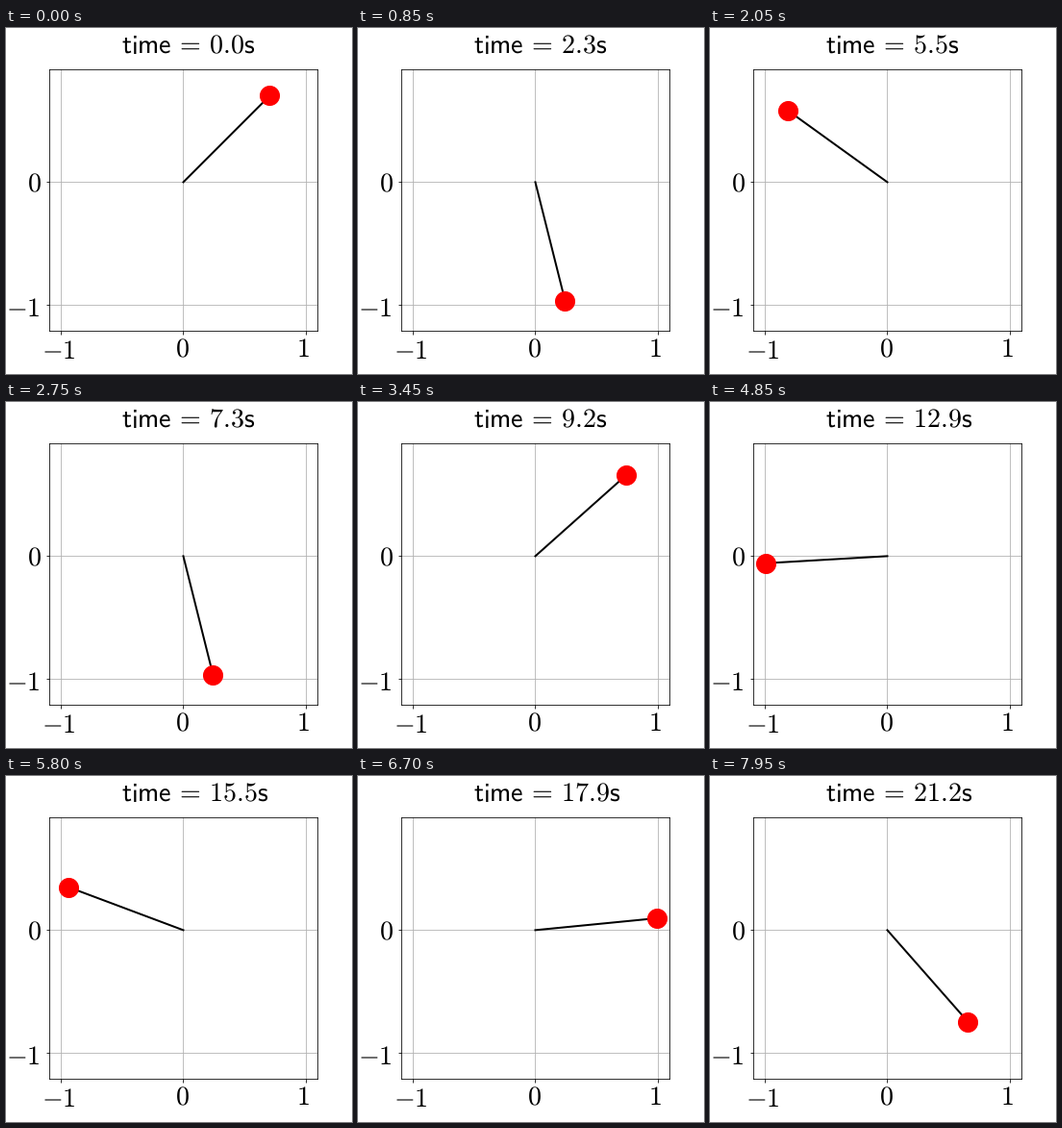
A matplotlib script that plays this animation: 360x360 px, repeating every 8000 ms.

```python
import numpy as np
import matplotlib.pyplot as plt
from matplotlib.animation import FuncAnimation

plt.rcParams["mathtext.fontset"] = "cm"
plt.rcParams["text.hinting"] = "none"

SIZE = 360
FRAMES = 160
DT = 2 / 15        # pendulum time per frame
SUBSTEPS = 20
LEFT, RIGHT, TOP, BOTTOM = 44.59, 324.39, 43, 315
FONT = 28


def slope(state):
    angle, speed = state
    return np.array([speed, -np.sin(angle)])


def swing():
    """Angles from the downward vertical, one per frame (RK4)."""
    state = np.array([0.75 * np.pi, 0.0])
    h = DT / SUBSTEPS
    angles = []
    for _ in range(FRAMES):
        angles.append(state[0])
        for _ in range(SUBSTEPS):
            k1 = slope(state)
            k2 = slope(state + h / 2 * k1)
            k3 = slope(state + h / 2 * k2)
            k4 = slope(state + h * k3)
            state = state + h / 6 * (k1 + 2 * k2 + 2 * k3 + k4)
    return np.array(angles)


def label(x, y, text):
    """Text with its left end and baseline at a pixel, y counted downwards."""
    return fig.text(x / SIZE, 1 - y / SIZE, text, fontsize=FONT,
                    ha="left", va="baseline")


def clock(t):
    return rf"$\mathsf{{time\hspace{{0.18}}=\hspace{{0.18}}{t:.1f}s}}$"


angles = swing()
xs, ys = np.sin(angles), -np.cos(angles)

fig = plt.figure(figsize=(5, 5), dpi=72, facecolor="white")
ax = fig.add_axes([LEFT / SIZE, 1 - BOTTOM / SIZE,
                   (RIGHT - LEFT) / SIZE, (BOTTOM - TOP) / SIZE])
half = 1.1 * (BOTTOM - TOP) / (RIGHT - LEFT)
middle = (np.sqrt(0.5) - 1) / 2
ax.set_xlim(-1.1, 1.1)
ax.set_ylim(middle - half, middle + half)
ax.set_xticks([-1, 0, 1], labels=[""] * 3)
ax.set_yticks([-1, 0], labels=[""] * 2)
ax.grid(True)

for x, y, text in [(37, 344, "$-1$"), (176.4, 342, "$0$"), (302.4, 342, "$1$"),
                   (-0.5, 300, "$-1$"), (22.5, 170, "$0$")]:
    label(x, y, text)

title = label(120.5, 26.6, clock(0))
rod, = ax.plot([], [], color="black", lw=2)
ball, = ax.plot([], [], "o", color="red", ms=20)


def draw(i):
    rod.set_data([0, xs[i]], [0, ys[i]])
    ball.set_data([xs[i]], [ys[i]])
    title.set_text(clock(i * DT))
    return rod, ball, title


anim = FuncAnimation(fig, draw, frames=FRAMES, interval=50,
                     repeat=True, repeat_delay=0)
plt.show()
```
